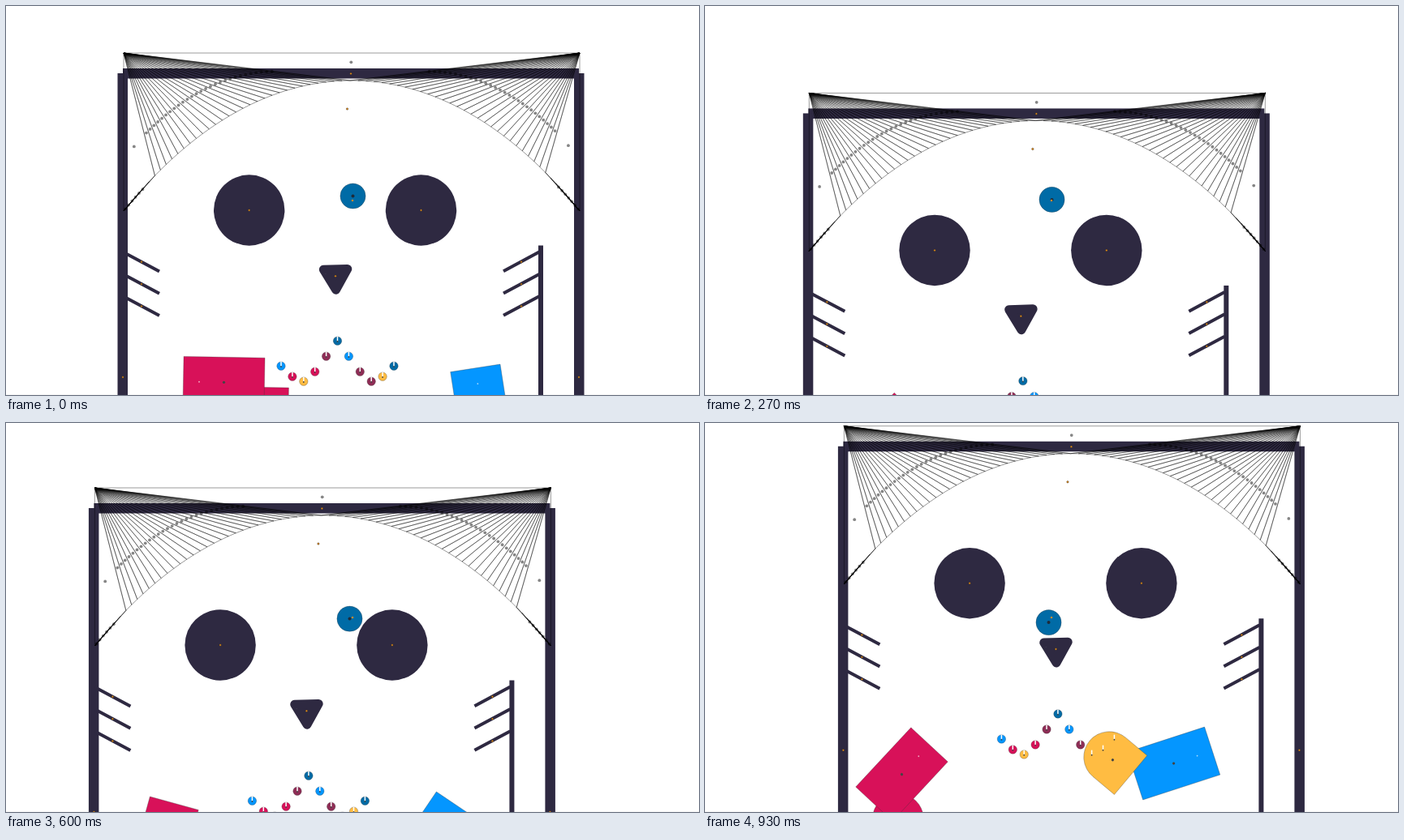
These frames come from a looping animation (854x480 px, 990 ms). An HTML page:

```html
<!DOCTYPE html>
<html lang="en">
<head>
<meta charset="utf-8">
<title>Pinball</title>
<style>
  html, body { margin: 0; width: 100%; height: 100%; overflow: hidden; background: #fff; }
  svg { display: block; width: 100vw; height: 100vh; }
  .wall { fill: #2e2941; }
  .bar { stroke: #2e2941; stroke-width: 4; }
  .mesh { fill: none; stroke: #000; stroke-width: .4; }
  .grey { fill: #000; fill-opacity: .48; }
  .pin { fill: #e8901c; stroke: #222; stroke-width: .4; }
  .body { stroke: #333; stroke-opacity: .6; stroke-width: .5; }
  .tick { stroke: #fff; stroke-width: 1.5; }
  .core { fill: #444; }
  .mark { fill: #fff; fill-opacity: .65; }
</style>
</head>
<body>
<svg viewBox="0 0 854 480">
  <rect y="479" width="854" height="1" fill="#f5f5f5"/>
  <g id="world">
    <g class="wall">
      <rect x="144" y="77" width="562" height="12.5"/>
      <rect x="137.5" y="83" width="12.5" height="700"/>
      <rect x="700" y="83" width="12.5" height="700"/>
      <rect x="656" y="295.5" width="6" height="500"/>
      <circle cx="299.7" cy="252" r="43.7"/>
      <circle cx="511.5" cy="252" r="43.7"/>
      <path d="M391.3 325.2L420.8 324.4 406.6 350.2Z" stroke="#2e2941" stroke-width="11" stroke-linejoin="round"/>
    </g>
    <path id="arch" d="M145 253C317 38.3 535 38.3 707 253" fill="none"/>
    <g id="fixed"></g>
    <g id="bumpers"></g>
    <g id="bodies"></g>
    <g id="ticks"></g>
  </g>
  <g id="ball">
    <circle class="body" r="15.6" fill="#006ba6"/>
    <circle r="2" fill="#1d2b3a"/>
  </g>
  <circle cx="427" cy="240" r="1.3" fill="#c88a32"/>
</svg>
<script>
const $ = id => document.getElementById(id);
const add = (parent, tag, attrs) => {
  const el = document.createElementNS('http://www.w3.org/2000/svg', tag);
  for (const k in attrs) el.setAttribute(k, attrs[k]);
  return parent.appendChild(el);
};
const dot = (parent, cx, cy, r, cls) => add(parent, 'circle', { cx, cy, r, class: cls });

const RED = '#d81159', PLUM = '#8f2d56', BLUE = '#0496ff', NAVY = '#006ba6', GOLD = '#ffbc42';
const fixed = $('fixed'), arch = $('arch');

// Triangulated dome above the arch, with a dot at each centroid
const length = arch.getTotalLength(), peak = length / 2 - 2, STEP = 9.72;
const onArch = s => {
  const p = arch.getPointAtLength(s);
  return [p.x, p.y];
};
function triangle(...pts) {
  add(fixed, 'path', { class: 'mesh', d: 'M' + pts.join('L') + 'Z' });
  const mean = k => pts.reduce((sum, p) => sum + p[k], 0) / 3;
  dot(fixed, mean(0), mean(1), 1.9, 'grey');
}
function fan(corner, at, from, to) {
  const n = Math.round((to - from) / STEP), step = (to - from) / n;
  for (let i = 0; i < n; i++) triangle(corner, at(from + i * step), at(from + (i + 1) * step));
}
function side(x, at, split, top) {
  const corner = [x, 58], foot = [x, 253];
  fan(corner, at, split, top);
  fan(foot, at, 0, split);
  triangle(corner, foot, at(split));
}
side(145, onArch, 58.2, peak);
side(707, s => onArch(length - s), 63.6, length - peak);
triangle([145, 58], [707, 58], onArch(peak));

// Whiskers
for (let i = 0; i < 3; i++) {
  const y = 315.8 + i * 27.3;
  add(fixed, 'path', { class: 'bar', d: `M145 ${y - 11.8}l44 23.4M613 ${y + 11.4}l44-23.6` });
  dot(fixed, 167, y, 1.2, 'pin');
  dot(fixed, 635, y, 1.2, 'pin');
}
for (const [x, y] of [[425, 83.5], [144, 458], [706, 458], [299.7, 252], [511.5, 252], [406, 333.3], [420.5, 127]])
  dot(fixed, x, y, 1.2, 'pin');

// Bumpers, mirrored about the middle one
const drop = [0, 19, 38, 50, 44, 31];
[BLUE, RED, GOLD, RED, PLUM, NAVY, BLUE, PLUM, PLUM, GOLD, NAVY].forEach((fill, i) => {
  const x = 339 + i * 13.9, y = 413 + drop[Math.abs(i - 5)];
  add($('bumpers'), 'circle', { class: 'body', cx: x, cy: y + .2, r: 5.2, fill });
  add($('ticks'), 'path', { class: 'tick', d: `M${x} ${y + .5}v-5.6` });
  dot($('ticks'), x, y + 1, .9, 'core');
});

// Motion: start, speed and acceleration per step; the ball hits an eye at step HIT
const HIT = 9;
const move = (i, start, speed = 0, accel = 0) => start + speed * i + accel * i * i;
const phase = (i, before, after) => i < HIT ? move(i, ...before) : move(i - HIT, ...after);

const camera = i => [
  phase(i, [0, -4.17], [-35.6, 13.9, -.3]),
  phase(i, [0, 20.23, -1.967], [22, -6.5, -1.75])
];
const ball = i => [
  phase(i, [427.5], [423.5]),
  phase(i, [234.5, 1.1], [241.6, .9])
];

const BLOCK = 'M-50-31H50V31H-50Z';
const DOME = 'M5.5-31.4H-29V31.4H5.5A31.4 31.4 0 0 0 5.5-31.4Z';
function loose(d, fill, markX, pose) {
  const el = add($('bodies'), 'g', {});
  add(el, 'path', { class: 'body', d, fill });
  dot(el, 0, 0, 1.6, 'core');
  dot(el, markX, 0, .9, 'mark');
  return { el, pose };
}
// Each pose is x, y and angle
const bodies = [
  loose(DOME, RED, -31, i => [
    move(i, 316.5, -7.57),
    move(i, 499.5, 20, -1.18),
    move(i, 91, -12.2)
  ]),
  loose(BLOCK, RED, 30.5, i => [
    phase(i, [268.5, .81, -.57], [229.6, -4.6, .38]),
    phase(i, [464.3, 6.72, -.363], [495.4, -1.52]),
    phase(i, [-179, 11.2], [-74.6, 8.2, -.54])
  ]),
  loose(BLOCK, BLUE, 30.5, i => [
    phase(i, [586, -2.48], [563.7, -5, .5]),
    phase(i, [496.2, -.49], [491.8, -4.6, .22]),
    phase(i, [-98.8, 4.75], [-56, 12, -.88])
  ]),
  loose(DOME, GOLD, -31, i => [476, move(i, 690.5, -15.75), move(i, 3, 15.5)])
];

const LOOP = 990, LAST = 14;
const startOf = i => Math.round(i * 20 / 3) * 10;
const place = (el, [x, y, turn = 0]) => el.setAttribute('transform', `translate(${x} ${y}) rotate(${turn})`);

function draw(now) {
  const t = now % LOOP;
  let i = LAST;
  while (startOf(i) > t) i--;
  place($('world'), camera(i));
  place($('ball'), ball(i));
  bodies.forEach(({ el, pose }) => place(el, pose(i)));
}
function tick() {
  draw(performance.now());
  requestAnimationFrame(tick);
}
tick();
</script>
</body>
</html>
```
